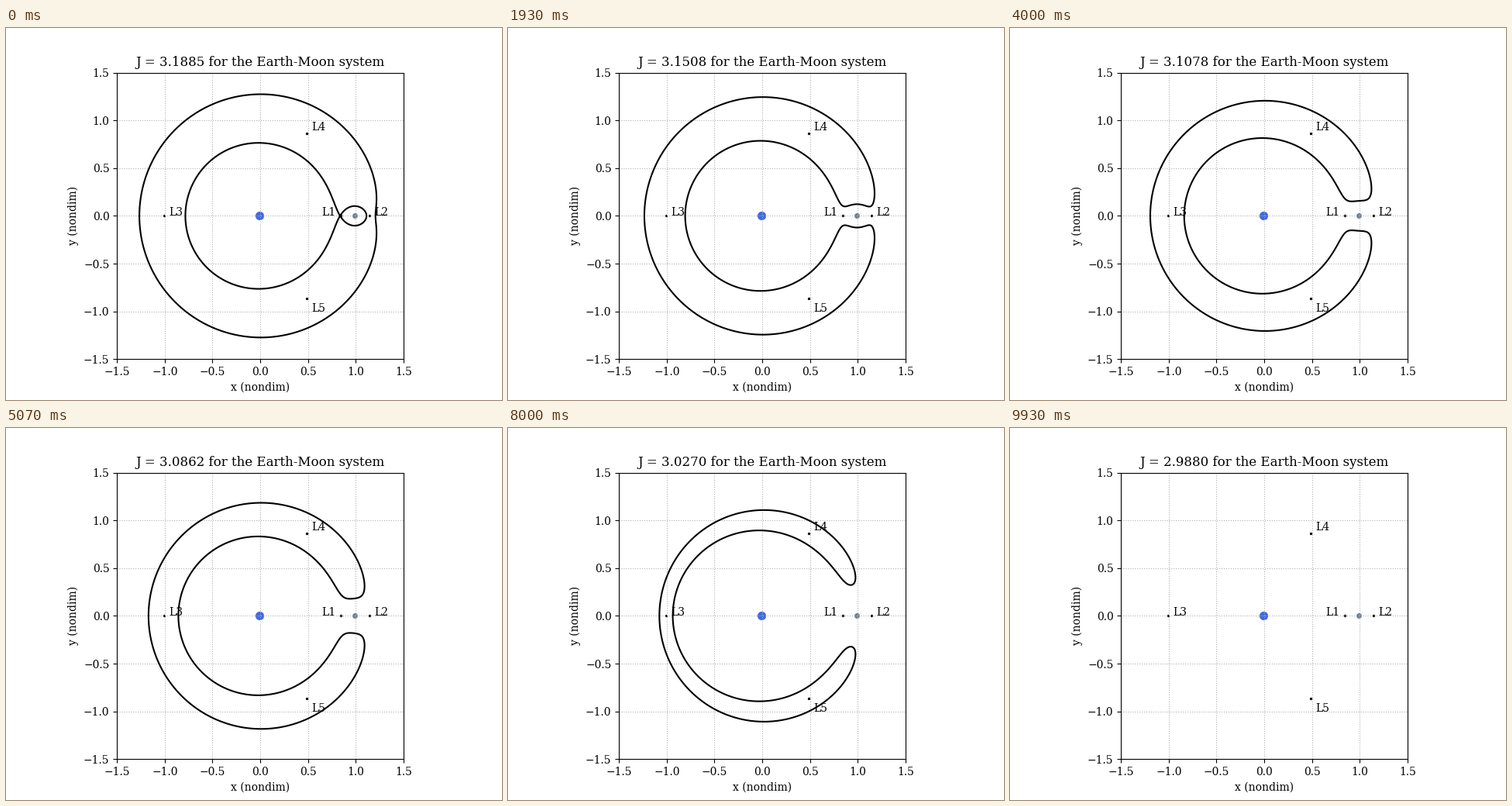
These frames come from a looping animation (640x480 px, 9.99 s). A matplotlib script:

```python
import numpy as np
import matplotlib.pyplot as plt
from matplotlib.animation import FuncAnimation

MU = 0.01215
FRAMES = 150
LOOP_MS = 9990

plt.rcParams["font.family"] = "DejaVu Serif"


def jacobi(x, y):
    """Jacobi constant of a body at rest in the rotating frame."""
    r1 = np.hypot(x + MU, y)
    r2 = np.hypot(x - 1 + MU, y)
    return x**2 + y**2 + 2 * (1 - MU) / r1 + 2 * MU / r2


# First-order positions of the equilibrium points
hill = (MU / 3) ** (1 / 3)
points = {
    "L1": (1 - hill, 0),
    "L2": (1 - MU + hill, 0),
    "L3": (-1 - 5 * MU / 12, 0),
    "L4": (0.5 - MU, np.sqrt(3) / 2),
    "L5": (0.5 - MU, -np.sqrt(3) / 2),
}
label_y = {"L4": 0.9, "L5": -1.0}

axis = np.linspace(-1.5, 1.5, 600)
X, Y = np.meshgrid(axis, axis)
J = jacobi(X, Y)
levels = np.linspace(jacobi(*points["L1"]), jacobi(*points["L4"]), FRAMES)

fig, ax = plt.subplots(figsize=(6.4, 4.8), dpi=100)
ax.set_aspect("equal")
ax.set_xlim(-1.5, 1.5)
ax.set_ylim(-1.5, 1.5)
ticks = np.linspace(-1.5, 1.5, 7)
ax.set_xticks(ticks)
ax.set_yticks(ticks)
ax.set_xlabel("x (nondim)")
ax.set_ylabel("y (nondim)")
ax.grid(linestyle=":")

ax.scatter(-MU, 0, s=50, color="royalblue")
ax.scatter(1 - MU, 0, s=16, color="slategray")
for name, (x, y) in points.items():
    ax.scatter(x, y, s=2, color="black")
    dx = -0.2 if name == "L1" else 0.05
    ax.text(x + dx, label_y.get(name, y), name)

curve = None


def update(i):
    global curve
    if curve is not None:
        curve.remove()
        curve = None
    level = levels[i]
    # The forbidden region vanishes at the last level
    if i < FRAMES - 1:
        curve = ax.contour(X, Y, J, levels=[level], colors="black",
                           linewidths=1.5)
    ax.set_title(f"J = {level:.4f} for the Earth-Moon system")
    return []


anim = FuncAnimation(fig, update, frames=FRAMES, interval=LOOP_MS / FRAMES,
                     init_func=lambda: [], repeat=True, repeat_delay=0,
                     blit=False)
plt.show()
```
